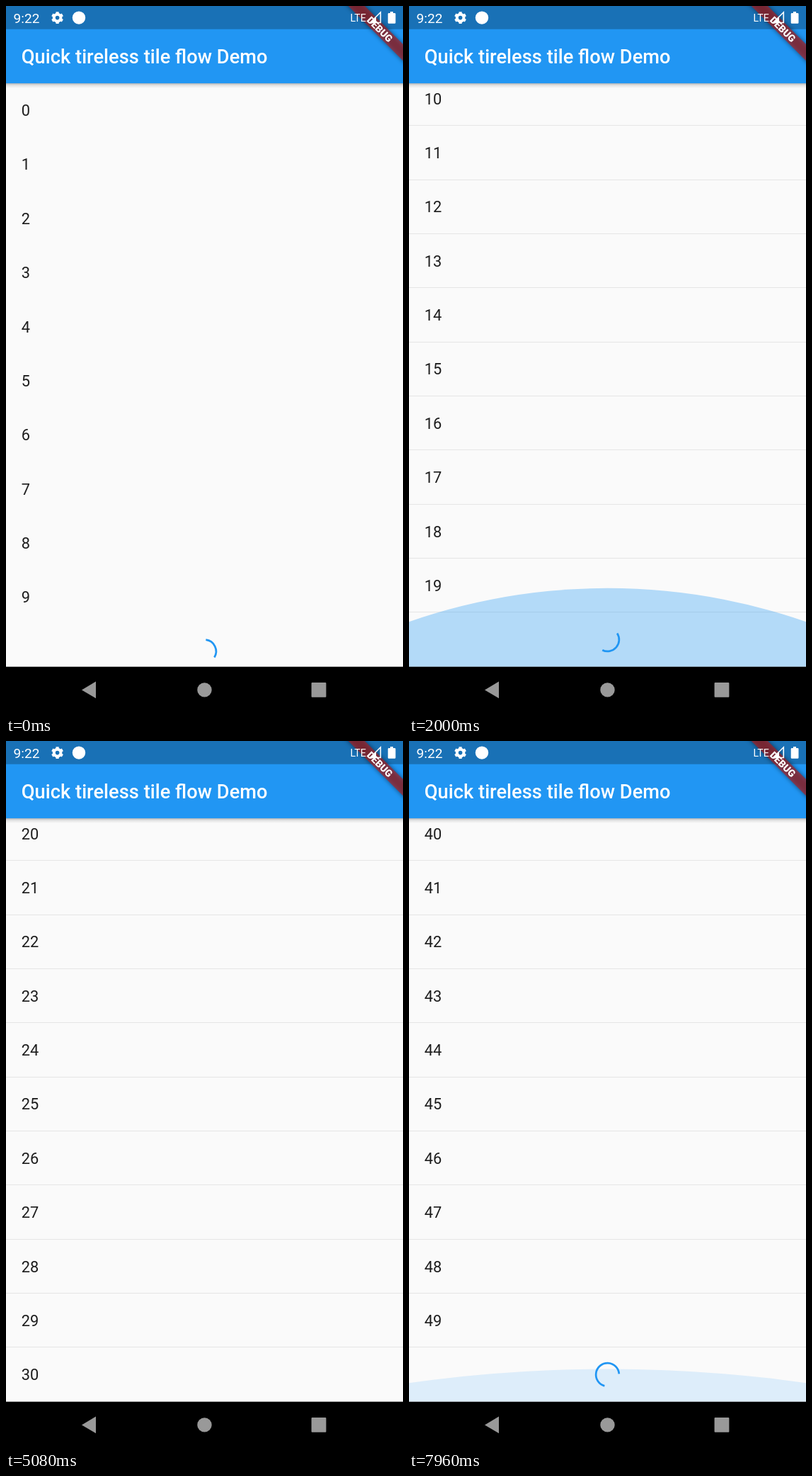
Animation of 561x998 px, one loop 8 s. Source, as an HTML page:

```html
<!DOCTYPE html>
<html lang="en">
<head>
<meta charset="utf-8">
<title>Endless list</title>
<style>
  html, body { margin: 0; width: 100%; height: 100%; overflow: hidden; background: #fafafa; }
  svg { display: block; width: 100%; height: 100%; font-family: Roboto, sans-serif; }
</style>
</head>
<body>
<svg viewBox="0 0 561 998">
  <defs>
    <clipPath id="view"><rect y="109.1" width="561" height="823.6"/></clipPath>
    <linearGradient id="fade" x2="0" y2="1">
      <stop offset="0" stop-opacity=".28"/>
      <stop offset=".4" stop-opacity=".1"/>
      <stop offset="1" stop-opacity="0"/>
    </linearGradient>
    <filter id="blur" x="-30%" y="-80%" width="160%" height="260%"><feGaussianBlur stdDeviation="3"/></filter>
  </defs>
  <rect width="561" height="998" fill="#fafafa"/>

  <g clip-path="url(#view)">
    <g id="rows" font-size="21.82" fill="#1d1d1d"></g>
    <path id="arc" fill="none" stroke="#2196f3" stroke-width="2.73"/>
    <g id="glow" fill="#2196f3"><circle cx="280.5" cy="728.8" r="841.5"/></g>
  </g>

  <rect y="109" width="561" height="7" fill="url(#fade)"/>
  <rect width="561" height="109.1" fill="#2196f3"/>
  <rect width="561" height="32.7" fill="#1971b6"/>
  <text x="21.8" y="81.3" font-size="27.27" font-weight="500" fill="#fff">Quick tireless tile flow Demo</text>

  <g transform="translate(561 0) rotate(45)">
    <rect x="-80" y="38.2" width="160" height="16.4" opacity=".5" filter="url(#blur)"/>
    <rect x="-80" y="38.2" width="160" height="16.4" fill="#b71c1c" fill-opacity=".63"/>
    <text y="51.4" font-size="13.9" font-weight="900" fill="#fff" text-anchor="middle">DEBUG</text>
  </g>

  <g fill="#fff">
    <text x="10.6" y="23.6" font-size="19.1">9:22</text>
    <g fill="none" stroke="#fff" transform="translate(72.6 16.6)">
      <circle r="4.8" stroke-width="4"/>
      <path id="teeth" stroke-width="4.2"/>
    </g>
    <circle cx="103" cy="16.6" r="9.2"/>
    <text x="486.5" y="21.8" font-size="14.2">LTE</text>
    <path d="M514.5 23.5 L529.3 8.8 V23.5 Z" fill="none" stroke="#fff" stroke-width="1.6"/>
    <path d="M515 23.5 L523 15.5 V23.5 Z"/>
    <path d="M543 8 h4 v2 h2.2 q1.3 0 1.3 1.3 v12.2 q0 1.3 -1.3 1.3 h-8.2 q-1.3 0 -1.3 -1.3 v-12.2 q0 -1.3 1.3 -1.3 h2 z"/>
  </g>

  <rect y="932.7" width="561" height="65.3"/>
  <g fill="#999">
    <path d="M127 953.5 V977.3 L107 965.4 Z"/>
    <circle cx="280.5" cy="965.4" r="10.2"/>
    <rect x="431.6" y="955" width="20.8" height="20.8" rx="1"/>
  </g>
</svg>
<script>
const LOOP = 8000, ROW = 76.364, TOP = 109.1, BOTTOM = 932.7;
const FETCH = 1000, ABSORB = 108, RECEDE = 600, PEAK = 0.33;
// Moments at which each loading row comes to life
const loaders = [-690, 1815, 3690, 5645, 7385];
// Swipes: start, impact with the end of the list, acceleration power
const swipes = [[1680, 1888, 2], [3590, 3969, 0.9], [5480, 5672, 2], [7270, 7637, 0.95]];

const $ = id => document.getElementById(id);
const clamp = x => Math.min(1, Math.max(0, x));
const decelerate = x => 1 - (1 - x) ** 2;

function add(parent, name, attrs) {
  const el = document.createElementNS('http://www.w3.org/2000/svg', name);
  for (const key in attrs) el.setAttribute(key, attrs[key]);
  return parent.appendChild(el);
}

// cubic-bezier(.4, 0, .2, 1)
function fastOutSlowIn(x) {
  if (x <= 0 || x >= 1) return clamp(x);
  let lo = 0, hi = 1, m;
  for (let i = 0; i < 20; i++) {
    m = (lo + hi) / 2;
    const bx = 1.2 * m * (1 - m) ** 2 + 0.6 * m * m * (1 - m) + m ** 3;
    if (bx < x) lo = m; else hi = m;
  }
  return 3 * m * m * (1 - m) + m ** 3;
}

const rows = Array.from({ length: 12 }, () => ({
  label: add($('rows'), 'text', { x: 21.8 }),
  line: add($('rows'), 'rect', { width: 561, height: 1, fill: '#000', opacity: 0.085 })
}));

let teeth = '';
for (let i = 0; i < 6; i++) {
  const a = i * Math.PI / 3 + Math.PI / 6, c = Math.cos(a), s = Math.sin(a);
  teeth += `M${5 * c} ${5 * s}L${8.4 * c} ${8.4 * s}`;
}
$('teeth').setAttribute('d', teeth);

function drawList(t, scroll, count) {
  const first = Math.floor(scroll / ROW);
  rows.forEach(({ label, line }, i) => {
    const n = first + i, y = TOP + n * ROW - scroll, shown = n < count;
    label.textContent = shown ? n : '';
    label.setAttribute('y', y + ROW / 2 + 7.8);
    line.setAttribute('y', Math.floor(y + ROW - 0.4));
    line.setAttribute('visibility', shown && t >= 40 ? 'visible' : 'hidden');
  });
}

function drawSpinner(age, cy) {
  const cycle = age / 1000, step = Math.floor(cycle), u = cycle - step;
  const head = fastOutSlowIn(u * 2), tail = fastOutSlowIn(u * 2 - 1);
  const start = -90 + 270 * tail + 306 * u - 144 * step;
  const sweep = Math.max(270 * (head - tail), 0.1);
  const point = deg => {
    const a = deg * Math.PI / 180;
    return `${280.5 + 16.36 * Math.cos(a)} ${cy + 16.36 * Math.sin(a)}`;
  };
  $('arc').setAttribute('d',
    `M${point(start)}A16.36 16.36 0 ${sweep > 180 ? 1 : 0} 1 ${point(start + sweep)}`);
}

function drawGlow(t) {
  let size = 0;
  for (const [, hit] of swipes) {
    const age = t - hit;
    if (age < 0 || age > ABSORB + RECEDE) continue;
    size = age < ABSORB ? decelerate(age / ABSORB) : 1 - decelerate((age - ABSORB) / RECEDE);
  }
  $('glow').setAttribute('transform', `translate(0 ${BOTTOM}) scale(1 ${-size}) translate(0 -1457.6)`
    .replace(' translate(0 -1457.6)', ' translate(0 -1457.6)'.replace('-1457.6', '-1457.5')));
  $('glow').setAttribute('opacity', PEAK * size);
  $('glow').setAttribute('visibility', size > 0.001 ? 'visible' : 'hidden');
}

// The glow circle reaches 112.7 above the lower edge when fully grown
$('glow').firstElementChild.setAttribute('cy', 112.7 - 841.5 + 1457.5);

function render(t) {
  const loaded = loaders.filter(s => t >= s + FETCH).length;
  const count = 10 + 10 * loaded;
  const scroll = swipes.reduce((sum, [from, to, power], i) =>
    sum + (i ? 10 * ROW : 21 * ROW - (BOTTOM - TOP)) * clamp((t - from) / (to - from)) ** power, 0);
  drawList(t, scroll, count);

  const born = loaders[loaded], active = born !== undefined && t >= born;
  $('arc').setAttribute('visibility', active ? 'visible' : 'hidden');
  if (active) drawSpinner(t - born, TOP + (count + 0.5) * ROW - scroll);
  drawGlow(t);
}

const began = performance.now();
function tick() {
  render((performance.now() - began) % LOOP);
  requestAnimationFrame(tick);
}
render(0);
requestAnimationFrame(tick);
</script>
</body>
</html>
```
